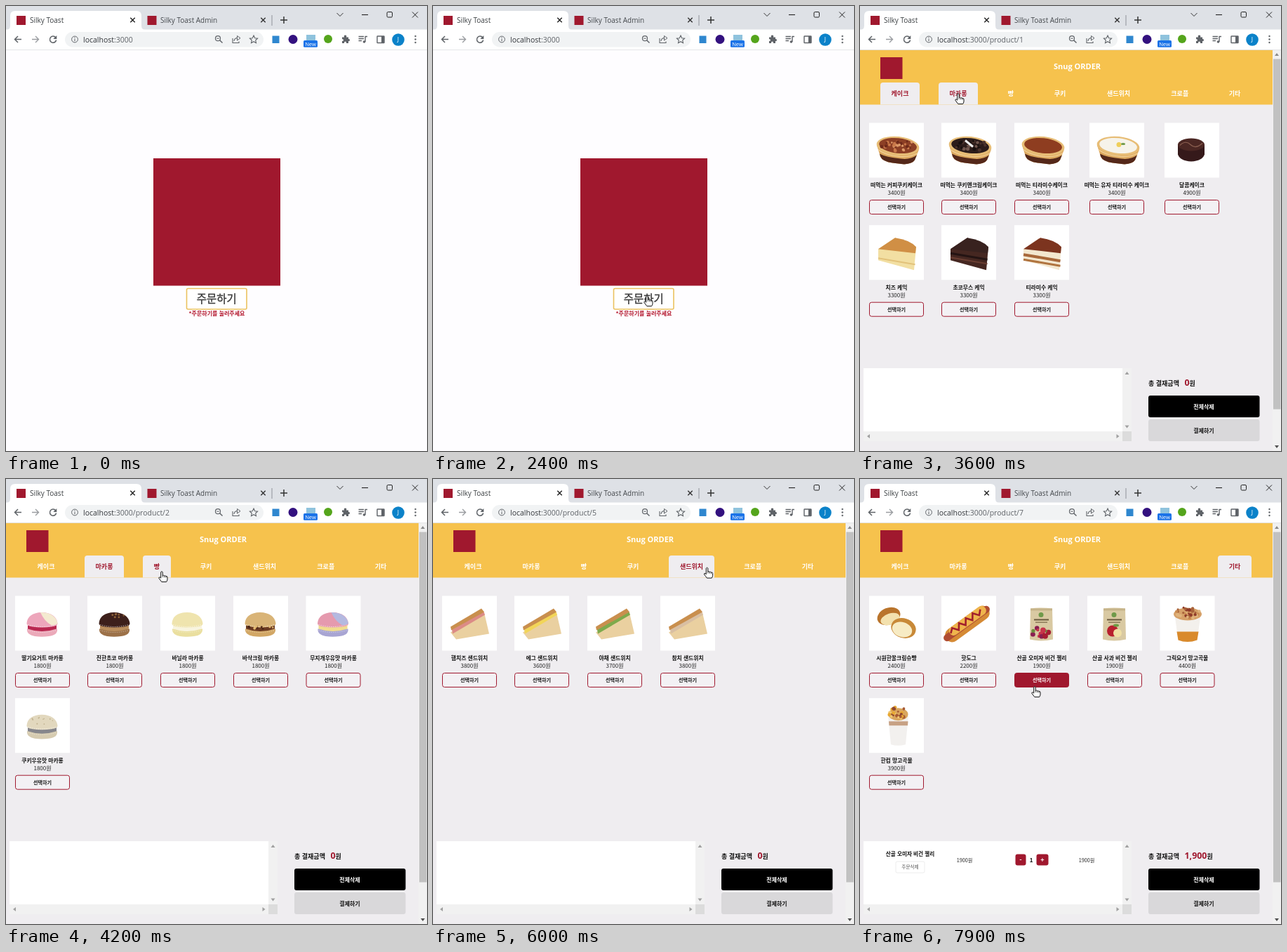
Write an HTML page that moves like this. It is 600 px wide and 634 px high and loops after 8 s.

```html
<!DOCTYPE html>
<html lang="ko">
<head>
<meta charset="utf-8">
<title>Silky Toast</title>
<style>
html, body { margin: 0; width: 100%; height: 100%; overflow: hidden; background: #fefdff; }
svg { display: block; width: 600px; height: 634px; }
text { font-family: 'Noto Sans CJK KR', 'Noto Sans CJK', 'Noto Sans KR', sans-serif; white-space: pre; }
.ui { font-family: 'Open Sans', 'Noto Sans', sans-serif; }
</style>
</head>
<body>
<svg id="stage" viewBox="0 0 600 634" xmlns="http://www.w3.org/2000/svg"></svg>
<script>
const RED = '#a0182e', GOLD = '#f6c24d', PAGE = '#efedf0', GREY = '#5f6368';
const LOOP = 8000, STEP = 100;

// ---- markup helpers ----
const rect = (x, y, w, h, fill, r = 0, extra = '') =>
  `<rect x="${x}" y="${y}" width="${w}" height="${h}" rx="${r}" fill="${fill}" ${extra}/>`;
const oval = (x, y, rx, ry, fill, extra = '') =>
  `<ellipse cx="${x}" cy="${y}" rx="${rx}" ry="${ry}" fill="${fill}" ${extra}/>`;
const disc = (x, y, r, fill, extra) => oval(x, y, r, r, fill, extra);
const shape = (d, fill, extra = '') => `<path d="${d}" fill="${fill}" ${extra}/>`;
const line = (d, color, w = 1, extra = '') =>
  shape(d, 'none', `stroke="${color}" stroke-width="${w}" ${extra}`);
// y is the vertical centre of the glyphs
const text = (x, y, size, str, fill = '#111', extra = '') =>
  `<text x="${x}" y="${y + size * 0.36}" font-size="${size}" fill="${fill}" ${extra}>${str}</text>`;
const MID = 'text-anchor="middle"', BOLD = 'font-weight="700"', MB = MID + ' ' + BOLD;
const group = (id, body, extra = '') => `<g id="${id}" ${extra}>${body}</g>`;

function seeded(seed) {
  return () => (seed = (seed * 16807) % 2147483647) / 2147483647;
}
function crumbs(n, cx, cy, rx, ry, colors, size, seed = 7) {
  const rnd = seeded(seed);
  let out = '';
  for (let i = 0; i < n; i++) {
    const a = rnd() * 6.283, r = Math.sqrt(rnd());
    out += disc(cx + Math.cos(a) * r * rx, cy + Math.sin(a) * r * ry, size * (0.6 + rnd() * 0.6), colors[i % colors.length]);
  }
  return out;
}

// ---- product pictures, each on a 78 x 78 tile ----
const tub = (top, extra = '') => `<g>` +
  shape('M11 32 L16 48 Q19 55 33 57 L50 59 Q62 58 65 53 L71 38Z', '#dba75e') +
  shape('M15 44 L16 48 Q19 55 33 57 L50 59 Q62 58 65 53 L68 46 Q58 53 45 51 Q24 49 15 44Z', '#54281a') +
  line('M13 38 Q22 46 44 48 Q60 49 69 43', '#f2d196', 1.5) +
  oval(41, 33, 30.5, 13.5, '#e7bd76', 'transform="rotate(6 41 33)"') +
  oval(41, 32.5, 27, 10.8, top, 'transform="rotate(6 41 33)"') + extra + `</g>`;

const slice = (top, side, layers) =>
  shape('M13 34 L37 18 L67 31 L64 64 L13 50Z', side) +
  layers.map(([y, c, w]) => line(`M13 ${y} L65.5 ${y + 9}`, c, w)).join('') +
  shape('M13 34 L37 18 Q58 21 67 31 L66 40Z', top);

const chocoRound =
  shape('M19 31 V45 Q22 54 38 55 Q54 54 57 45 V31Z', '#35191a') +
  oval(38, 31, 19, 9, '#4b2723') + line('M22 32 Q30 24 37 31 T54 29', '#8b5f50', 1.2);

const macaron = (top, fill, base, extra = '') =>
  shape('M17 47 H60 Q61 56 48 57.5 Q38 59 28 57.5 Q16 55 17 47Z', base) +
  shape('M18 40 Q38 46 59 40 L59 47 Q38 54 18 47Z', fill) +
  shape('M16.5 39 Q18 24 38 23.5 Q58 24 60.5 39 Q61 43 52 44 Q38 46 25 44 Q16 43 16.5 39Z', top) +
  line('M18 41 Q38 47 59 41', '#fff', 1.1, 'stroke-dasharray="1.5 1.5" opacity=".55"') +
  line('M18 49 Q38 55 59 49', '#fff', 1, 'stroke-dasharray="1.5 1.5" opacity=".4"') + extra;
const halfTint = c => shape('M36 23.6 Q57 24 60.5 39 Q60 41 52 42 Q42 37 36 23.6Z', c);

const CROFFLE = 'M6 52 Q8 44 17 38 Q26 27 40 25 Q49 18 57 22 Q68 20 71 28 Q70 35 62 41 Q56 51 42 53 Q30 59 21 54 Q12 57 6 52Z';
function croffle(body, grid, extra = '') {
  let lines = '';
  for (let i = 0; i < 6; i++) {
    const x = 14 + i * 9, y = 44 - i * 3.6;
    lines += `M${x - 4} ${y - 9} l13 18 M${x + 9} ${y - 10} l-9 21 `;
  }
  return shape(CROFFLE, body) + crumbs(20, 38, 40, 24, 10, ['#8a3420', '#772819'], 2.6, 11) +
    line(lines, grid, 1.7) + line(CROFFLE, '#b36a2a', 1.2) + extra;
}

const honeyBread =
  oval(28, 29, 17, 12, '#b9742c', 'transform="rotate(-22 28 29)"') +
  oval(30, 33, 14, 8, '#f3e1ae', 'transform="rotate(-18 30 33)"') +
  oval(49, 46, 18, 14, '#c88938', 'transform="rotate(18 49 46)"') +
  oval(47, 48, 14.5, 10.5, '#f7ebc4', 'transform="rotate(18 47 48)"');
const hotdog = `<g transform="rotate(-36 37 40)">` +
  rect(0, 30, 74, 20, '#d58a35', 10) + rect(-3, 34, 79, 10, '#b04c32', 5) + rect(9, 30, 62, 13, '#efb54c', 6) +
  line('M10 37 l6 -5 l6 8 l6 -8 l6 8 l6 -8 l6 8 l6 -8 l6 8 l6 -6', '#a2202c', 2.6) + `</g>`;
const pouch = fruit =>
  shape('M23 18 Q38 16 54 18 L55 62 Q38 66 22 62Z', '#d9c9a2') + rect(23, 18, 31, 3, '#c6b48a') +
  disc(38, 27, 3.5, '#6f9a4a') + rect(28, 33, 21, 2, '#6b5a3f') + rect(30, 37, 17, 1.5, '#8b7a58') + fruit;
const berries = crumbs(14, 38, 52, 13, 7, ['#a51d33', '#c7354a', '#6c8b3c', '#8a1e50'], 3.4, 5);
const apple = disc(36, 50, 8, '#b8202e') + disc(43, 53, 6, '#f0dfa4') + oval(41, 42, 4, 2, '#6c9b43');
const bowl =
  shape('M21 27 H58 L53 63 Q39 68 26 63Z', '#f3f0ec') + shape('M24 51 H55 L53 63 Q39 68 26 63Z', '#d98a2c') +
  oval(39.5, 26, 20, 9, '#d6a068') + crumbs(34, 39, 24, 18, 8, ['#a8623a', '#e0b47c', '#8f3b2a', '#c98a50'], 2.3, 3);
const tallCup =
  shape('M27 25 H56 L52 66 Q41 69 31 66Z', '#f2f0ee') + shape('M28 33 H55.5 L55 39 H28.5Z', '#c7a184') +
  oval(41.5, 23, 14, 9, '#d9a65e') + crumbs(26, 41, 21, 13, 9, ['#e8a832', '#a85c34', '#f0c772', '#8e4630'], 2.2, 9);

const loaf = (crust, mark) =>
  shape('M12 48 Q14 26 39 24 Q64 26 66 48 Q64 57 39 58 Q14 57 12 48Z', crust) +
  line('M25 32 L31 46 M38 29 L41 45 M50 31 L52 44', mark, 3, 'stroke-linecap="round"');
const cookie = (base, chip) => disc(39, 41, 22, base) + crumbs(16, 39, 41, 17, 17, [chip], 2.4, 21);
const sandwich = fill =>
  shape('M12 52 L60 24 L67 54 L20 62Z', '#ead0a0') + shape('M14 48 L59 22 L61 27 L15 54Z', fill) +
  shape('M12 44 L56 18 L60 23 L13 49Z', '#c98f4e');

const TABS = [['케이크', 29, 56], ['마카롱', 112, 56], ['빵', 195, 40], ['쿠키', 261, 48],
  ['샌드위치', 336, 65], ['크로플', 428, 55.5], ['기타', 510, 48]];

const LISTS = [
  [['떠먹는 커피쿠키케이크', 3400, tub('#8c3f25', crumbs(34, 41, 32, 24, 8, ['#c9794a', '#6e2a1a', '#dd9a68'], 2, 4))],
   ['떠먹는 쿠키앤크림케이크', 3400, tub('#2c1c1a', crumbs(26, 41, 32, 24, 8, ['#4a322c', '#18100f', '#70564e'], 2.2, 6) + line('M34 25 L45 34', '#eee', 3))],
   ['떠먹는 티라미수케이크', 3400, tub('#8e3d20')],
   ['떠먹는 유자 티라미수 케이크', 3400, tub('#f6f3ea', disc(42, 31, 3.5, '#efcf5a') + oval(48, 30, 3, 1.5, '#6f9a4a'))],
   ['달콤케이크', 4900, chocoRound],
   ['치즈 케익', 3300, slice('#d08f45', '#f2dfa2', [[47, '#e2c27a', 2]])],
   ['초코무스 케익', 3300, slice('#38221f', '#452721', [[40, '#241413', 3], [46, '#6a3e32', 2]])],
   ['티라미수 케익', 3300, slice('#7c341f', '#f3e7cf', [[42, '#a8683a', 4], [49, '#b0743f', 3]])]],
  [['딸기요거트 마카롱', 1800, macaron('#eda6bb', '#b92850', '#eba9b9', halfTint('#f4ead0'))],
   ['진한초코 마카롱', 1800, macaron('#3d201b', '#b98d5c', '#9c7148', crumbs(7, 43, 28, 9, 3, ['#8d6238'], 1.5))],
   ['바닐라 마카롱', 1800, macaron('#efe4ae', '#f8f4df', '#eadf9f')],
   ['바삭크림 마카롱', 1800, macaron('#d9b477', '#6b3a22', '#d2a765', crumbs(12, 38, 45, 19, 2, ['#e1b870', '#4c2618'], 1.6))],
   ['무지개우유맛 마카롱', 1800, macaron('#e59aae', '#f0dc8f', '#a8a5d3', halfTint('#b4b9e0'))],
   ['쿠키우유맛 마카롱', 1800, macaron('#e2d8be', '#86868c', '#d6cbb0', crumbs(10, 38, 32, 16, 6, ['#bfb08c'], 0.9))]],
  [['소금버터빵', 2500, loaf('#cf8d3e', '#f0cf8e')], ['크림단팥빵', 2300, loaf('#a9622c', '#d79b58')],
   ['우유식빵', 2800, loaf('#dba75c', '#f6e2b4')], ['초코크림빵', 2600, loaf('#6a3a22', '#b98a5c')],
   ['치즈모닝빵', 2400, loaf('#d69a44', '#f4d67a')]],
  [['초코칩쿠키', 2000, cookie('#c48b4c', '#4a2618')], ['더블초코쿠키', 2000, cookie('#59301f', '#25120d')],
   ['마카다미아쿠키', 2200, cookie('#d9ac68', '#f4e4bd')], ['딸기쿠키', 2200, cookie('#dba08c', '#a8344a')]],
  [['햄치즈 샌드위치', 3800, sandwich('#dc8b86')], ['에그 샌드위치', 3600, sandwich('#f2d558')],
   ['야채 샌드위치', 3700, sandwich('#7eaa4c')], ['참치 샌드위치', 3800, sandwich('#d9bfa2')]],
  [['플레인크로플', 2500, croffle('#c67e35', '#f3dcc4')],
   ['체다치즈크로플', 3000, croffle('#cf7a25', '#f0b348')],
   ['아이스크림크로플', 3500, croffle('#cb8234', '#efc070', disc(44, 33, 13, '#eadfc8') + crumbs(16, 44, 30, 10, 9, ['#c6ae86'], 0.9))]],
  [['시원한꿀크림슈빵', 2400, honeyBread], ['핫도그', 2200, hotdog],
   ['산골 오미자 비건 젤리', 1900, pouch(berries)], ['산골 사과 비건 젤리', 1900, pouch(apple)],
   ['그릭요거 망고곡물', 4400, bowl], ['한컵 망고곡물', 3900, tallCup]]
];

const columns = list => list === 0 ? [13, 116, 220, 327, 434] : [13, 116, 220, 324, 427.5];
const cell = (list, i) => ({ x: columns(list)[i % 5], y: 166.5 + 145.7 * Math.floor(i / 5) });

function productList(list) {
  return LISTS[list].map(([name, price, art], i) => {
    const { x, y } = cell(list, i), cx = x + 39;
    return rect(x, y, 78, 78, '#fff') + `<g transform="translate(${x} ${y})">${art}</g>` +
      text(cx, y + 88.5, 7.8, name, '#111', MB) + text(cx, y + 100, 8, price + '원', '#222', MID) +
      group(`pick${list}_${i}`, rect(x + 0.5, y + 110, 77, 20, '#f3f1f4', 3, `stroke="${RED}"`) +
        text(cx, y + 120, 7.1, '선택하기', '#111', MB));
  }).join('');
}

// ---- browser window ----
const cross = (x, y, r, c, w = 1.2) => line(`M${x - r} ${y - r} L${x + r} ${y + r} M${x + r} ${y - r} L${x - r} ${y + r}`, c, w);

const browser =
  rect(0, 0, 600, 34, '#dee1e6') +
  shape('M0 34 Q6 34 6 28 V14 Q6 7 13 7 H186 Q193 7 193 14 V28 Q193 34 199 34Z', '#fff') +
  rect(0, 33.5, 600, 28.5, '#fff') + rect(0, 62, 600, 0.8, '#dfe0e3') +
  rect(15, 14, 13, 13, RED) + rect(201.5, 14, 13, 13, RED) +
  text(34, 20.3, 10, 'Silky Toast', '#3c4043', 'class="ui"') +
  text(220, 20.3, 10, 'Silky Toast Admin', '#45494d', 'class="ui"') +
  cross(180.5, 20, 3.2, '#222', 1.4) + cross(366.5, 20, 3.2, '#333', 1.4) +
  rect(378.5, 13, 1, 15, '#8d9197') + line('M391 20 H401 M396 15 V25', '#333', 1.5) +
  line('M471.5 10 L476 14.5 L480.5 10', '#333', 1) + line('M507 12.5 H516', '#222', 1.1) +
  rect(543, 8.5, 7.5, 7.5, 'none', 1.5, 'stroke="#222"') + cross(583, 12.5, 4, '#222', 1) +
  line('M22 47.5 H12.5 M17 43 L12.5 47.5 L17 52', GREY, 1.5) +
  line('M37 47.5 H46.5 M42 43 L46.5 47.5 L42 52', '#9a9da1', 1.4) +
  line('M70.8 45 A4.6 4.6 0 1 0 71.6 48.5', GREY, 1.5) + shape('M72.3 42 V47 H67.3Z', GREY) +
  rect(84, 37, 283, 21.5, '#f1f3f4', 10.7) +
  disc(98, 47.5, 4.4, 'none', `stroke="${GREY}"`) + line('M98 47 V50 M98 44.8 V46', GREY, 1.1) +
  disc(302, 46.2, 3.5, 'none', `stroke="${GREY}" stroke-width="1.2"`) + line('M304.6 48.8 L308.5 52.5', GREY, 1.5) + line('M300.3 46.2 H303.7', GREY, 1) +
  line('M323 46 V52.5 H332 V50.5 M325 50 Q325.5 45.5 330 45.5', GREY, 1.1) + shape('M329.5 42.5 L334 45.7 L329.5 49Z', 'none', `stroke="${GREY}"`) +
  shape('M353 42 L354.7 45.7 L358.6 46.1 L355.7 48.8 L356.5 52.7 L353 50.7 L349.5 52.7 L350.3 48.8 L347.4 46.1 L351.3 45.7Z', 'none', `stroke="${GREY}" stroke-width="1.1"`) +
  rect(379.5, 42.5, 10, 10.5, '#2f87cf') + disc(409, 47.5, 6.5, '#33117f') +
  rect(428, 41, 13, 9, '#8fc3dd') + rect(424, 49, 20, 9.8, '#1a73e8', 1.5) + text(434, 54, 7.6, 'New', '#fff', MID + ' class="ui"') +
  disc(459, 47, 6, '#55a51c') +
  shape('M479 44.5 H482 Q481 41.5 483.5 41.5 Q486 41.5 485 44.5 H488 V47 Q490 46.5 490 48.5 Q490 50.5 488 50 V53 H485 Q485.3 50.5 483.5 50.5 Q481.7 50.5 482 53 H479 V50 Q481 50 481 48.5 Q481 47 479 47Z', GREY) +
  line('M502.5 43.5 H510 M502.5 46.5 H510 M502.5 49.5 H507 M512 51 V43.5 H515', GREY, 1.4) + disc(510.5, 51, 1.8, GREY) +
  rect(529, 43, 10, 9.5, 'none', 0.5, `stroke="${GREY}" stroke-width="1.4"`) + rect(535, 43, 4, 9.5, GREY) +
  disc(559, 48, 8.8, '#0b82c9') + text(559, 48, 8.5, 'J', '#fff', MID + ' class="ui"') +
  [43, 47.5, 52].map(y => disc(583.5, y, 1.2, GREY)).join('') +
  text(110, 47.8, 10.5, `<tspan fill="#33363a">localhost</tspan><tspan id="path"></tspan>`, GREY, 'class="ui"');

// ---- pages ----
const home = rect(0, 62.8, 600, 571.2, '#fefdff') + rect(210, 217, 181, 181.5, RED) +
  rect(257.5, 402.5, 85.5, 29.5, '#fff', 2, 'stroke="#ebc25f" stroke-width="1.6"') +
  text(300.3, 417.5, 15.5, '주문하기', '#3a3a3a', MID + ' stroke="#3a3a3a" stroke-width=".4"') +
  text(300.5, 438, 8, '*주문하기를 눌러주세요', '#b3142b', MB);

const tabBar = TABS.map(([name, x, w], i) =>
  shape(`M${x} 140.5 V113 Q${x} 109 ${x + 4} 109 H${x + w - 4} Q${x + w} 109 ${x + w} 113 V140.5Z`, PAGE, `id="tab${i}"`) +
  text(x + w / 2, 124.5, 9, name, '#fff', `id="label${i}" ${MB}`)).join('');

const arrowHead = (x, y, dx, dy, c) =>
  shape(dx ? `M${x + dx} ${y} L${x - dx} ${y - 3} V${y + 3}Z` : `M${x} ${y + dy} L${x - 3} ${y - dy} H${x + 3}Z`, c);

const cart = text(71.5, 534.5, 7.6, '산골 오미자 비건 젤리', '#111', MB) +
  rect(51, 545, 41, 16, '#fff', 2, 'stroke="#ececec"') + text(71.5, 553, 6.6, '주문삭제', '#555', MID) +
  text(149, 543, 7.2, '1900원', '#222', MID) + text(323, 543, 7.2, '1900원', '#222', MID) +
  rect(221.5, 534.5, 15, 16, RED, 3) + text(229, 542.5, 9, '-', '#fff', MB) +
  text(244, 543, 8, '1', '#111', MB) +
  rect(251.5, 534.5, 17, 16, RED, 3) + text(260, 542.5, 9, '+', '#fff', MB);

const shop = rect(0, 62.8, 588, 571.2, PAGE) + rect(0, 62.5, 588, 78, GOLD) +
  rect(29, 73, 31.5, 31, RED) +
  text(309.5, 86.5, 11, 'Snug ORDER', '#fff', MB + ' class="ui"') + tabBar +
  rect(588, 62.5, 12, 571.5, '#f1f1f1') + rect(589, 75.5, 10.5, 499, '#c1c1c1') +
  arrowHead(594, 69, 0, -2, '#8a8a8a') + arrowHead(594, 628, 0, 2, '#505050') +
  LISTS.map((_, i) => group('list' + i, productList(i))).join('') +
  group('loading', text(0, 160.5, 8, 'Loading...', '#222')) +
  rect(5, 516, 369, 90, '#fff') + rect(374, 516, 13, 90, '#f1f1f1') + rect(5, 606, 369, 14, '#f1f1f1') +
  rect(374, 606, 13, 14, '#dcdcdc') +
  arrowHead(380.5, 523, 0, -2, '#a0a0a0') + arrowHead(380.5, 599.5, 0, 2, '#a0a0a0') +
  arrowHead(12, 613, -2, 0, '#a0a0a0') + arrowHead(367.5, 613, 2, 0, '#a0a0a0') +
  group('cart', cart) +
  text(411, 537.5, 9, '총 결재금액', '#111', BOLD) +
  `<text x="462.5" y="541" font-weight="700"><tspan id="total" class="ui" font-size="12.4" fill="${RED}"></tspan><tspan font-size="9" fill="#111">원</tspan></text>` +
  rect(411, 555, 158.5, 31, '#000', 3) + text(490, 571, 8, '전체삭제', '#fff', MB) +
  rect(411, 589, 158.5, 31, '#d9d8da', 3) + text(490, 605, 8, '결제하기', '#111', MB);

const arrow = shape('M0 0 V16 L3.7 12.6 L6.3 18.8 L9 17.6 L6.4 11.6 H11.4Z', '#000', 'stroke="#fff" stroke-width=".8"');
const hand = shape('M-1.3 0.6 Q0 -1.2 1.2 0.6 V5.6 Q2.6 4.6 3.6 6 Q5 5.2 5.9 6.6 Q7.8 6 8 8 V11 Q7.8 13 6.6 14.6 H-0.2 Q-2 12 -4 9.6 Q-4.6 7.6 -2.6 8 L-1.3 9.2Z',
  '#fff', 'stroke="#111" stroke-width="1"') + line('M1.2 5.5 V8 M3.6 6 V8.4 M5.9 6.6 V8.8', '#111', 0.7);

const $ = id => document.getElementById(id);
$('stage').innerHTML = group('home', home) + group('shop', shop) + browser +
  group('cursor', group('arrow', arrow) + group('hand', hand));

// ---- timeline ----
// [start, tab, loading, address number]
const SCENES = [[0, -1, 0, 0], [2600, 0, 1, 1], [2800, 0, 0, 1], [3700, 1, 0, 2], [4400, 2, 1, 2], [4600, 2, 0, 3],
  [5100, 3, 1, 3], [5300, 3, 0, 4], [5700, 4, 1, 4], [5900, 4, 0, 5], [6300, 5, 1, 5], [6500, 5, 0, 6], [6900, 6, 0, 7]];
// [time, x, y] of the pointer tip: it settles on each place before the click
const MOVES = [[1700, 612, 330], [2400, 305, 413], [3000, 305, 413], [3500, 140, 125], [3800, 140, 125], [4200, 222, 132],
  [4600, 222, 132], [5000, 277, 122], [5200, 277, 122], [5500, 368, 126], [5900, 368, 126], [6200, 455, 128],
  [6400, 455, 128], [6700, 525, 132], [7000, 525, 132], [7600, 249, 296]];
const ADD_AT = 7900;

const ease = k => k * k * (3 - 2 * k);
function pointer(t) {
  const i = MOVES.findIndex(m => m[0] > t);
  if (i === 0) return MOVES[0].slice(1);
  if (i < 0) return MOVES[MOVES.length - 1].slice(1);
  const [t0, x0, y0] = MOVES[i - 1], [t1, x1, y1] = MOVES[i];
  const k = ease((t - t0) / (t1 - t0));
  return [x0 + (x1 - x0) * k, y0 + (y1 - y0) * k];
}
const show = (id, on) => $(id).setAttribute('display', on ? 'inline' : 'none');
const inside = (x, y, bx, by, w, h) => x >= bx && x <= bx + w && y >= by && y <= by + h;

function draw(t) {
  const [, tab, loading, page] = SCENES.filter(s => s[0] <= t).pop();
  const [x, y] = pointer(t), atHome = tab < 0;
  let over = atHome && inside(x, y, 257, 402, 86, 30);
  show('home', atHome);
  show('shop', !atHome);
  show('loading', loading);
  $('path').textContent = ':3000' + (page ? '/product/' + page : '');

  TABS.forEach(([, bx, w], i) => {
    const hot = !atHome && inside(x, y, bx, 109, w, 31);
    const lit = i === tab || hot;
    over = over || hot;
    show('tab' + i, lit);
    $('label' + i).setAttribute('fill', lit ? RED : '#fff');
  });
  LISTS.forEach((items, list) => {
    const open = list === tab && !loading;
    show('list' + list, open);
    items.forEach((_, i) => {
      const c = cell(list, i), hot = open && inside(x, y, c.x, c.y + 109, 78, 21);
      const [box, label] = $(`pick${list}_${i}`).children;
      over = over || hot;
      box.setAttribute('fill', hot ? RED : '#f3f1f4');
      label.setAttribute('fill', hot ? '#fff' : '#111');
    });
  });

  const added = t >= ADD_AT;
  show('cart', added);
  $('total').textContent = added ? '1,900' : '0';
  $('cursor').setAttribute('transform', `translate(${x.toFixed(1)} ${y.toFixed(1)})`);
  show('hand', over && !loading);
  show('arrow', !over || loading);
}

const begin = performance.now();
function tick() {
  const t = (performance.now() - begin) % LOOP;
  draw(Math.floor(t / STEP) * STEP);
  requestAnimationFrame(tick);
}
tick();
</script>
</body>
</html>
```
